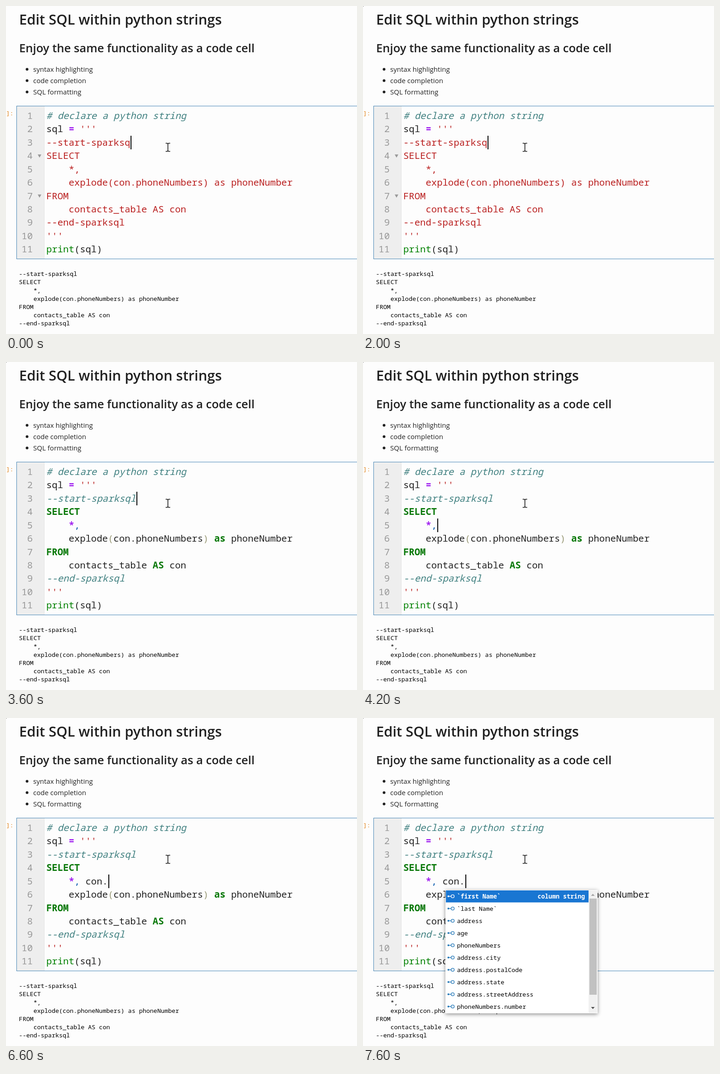
Recreate the animation shown at these times as an HTML page. Size 775 by 723 pixels, loop 8 s.

```html
<!DOCTYPE html>
<html lang="en">
<head>
<meta charset="utf-8">
<title>Edit SQL within python strings</title>
<style>
  html, body { margin: 0; width: 100%; height: 100%; overflow: hidden; background: #fdfdfd; }
  svg { display: block; width: 775px; height: 723px; }
  text { white-space: pre; fill: #212121; }
  .prose { font-family: "Open Sans", "Noto Sans", sans-serif; }
  .head { font-weight: 600; }
  .mono { font-family: "Noto Sans Mono", "DejaVu Sans Mono", monospace; font-size: 13.4px; }
  .code { font-size: 20.6px; }
  .output { fill: #000; font-weight: 500; }
  .prompt { font-weight: 500; }
  .number { fill: #999; text-anchor: end; }
  .comment { fill: #408080; font-style: italic; }
  .string { fill: #ba2121; }
  .operator { fill: #a020f0; font-weight: 700; }
  .keyword { fill: #087808; font-weight: 700; }
  .builtin { fill: #008000; }
  .comma { fill: #0055aa; }
  .paren { fill: #999977; }
  .raw .sql text { fill: #ba2121; font-weight: 400; font-style: normal; }
  .chosen { fill: #fff; font-weight: 700; }
  .icon { fill: none; stroke: #2478b8; stroke-width: 1.4; }
  .popup-box { filter: drop-shadow(0 2px 4px rgba(0, 0, 0, .45)); }
</style>
</head>
<body>
<svg id="stage" viewBox="0 0 775 723"></svg>
<script>
const LOOP = 8000;
const LEFT = 89, CHAR = 12.36, LINE = 29.42, BASE = 249;
const stage = document.getElementById('stage');

function add(parent, tag, attrs = {}, content) {
  const node = document.createElementNS('http://www.w3.org/2000/svg', tag);
  for (const key in attrs) node.setAttribute(key, attrs[key]);
  if (content !== undefined) node.textContent = content;
  return parent.appendChild(node);
}
const group = (parent, cls = '') => add(parent, 'g', { class: cls });
const write = (parent, x, y, cls, content, size) =>
  add(parent, 'text', { x, y, class: cls, ...(size && { style: `font-size:${size}px` }) }, content);
const box = (parent, x, y, width, height, fill, extra) =>
  add(parent, 'rect', { x, y, width, height, fill, ...extra });
const lineY = n => BASE + (n - 1) * LINE;
const token = (parent, line, col, cls, content) =>
  write(parent, LEFT + col * CHAR, lineY(line), 'mono code ' + cls, content);
const show = (node, on) => node.setAttribute('visibility', on ? 'visible' : 'hidden');

// Headings and list
write(stage, 29, 41, 'prose head', 'Edit SQL within python strings', 30.9);
write(stage, 29, 102, 'prose head', 'Enjoy the same functionality as a code cell', 25.6);
['syntax highlighting', 'code completion', 'SQL formatting'].forEach((item, i) => {
  add(stage, 'circle', { cx: 46.5, cy: 139.5 + 25 * i, r: 3, fill: '#212121' });
  write(stage, 60, 145 + 25 * i, 'prose', item, 15.05);
});

// Cell frame and gutter
const prompt = write(stage, 0.4, 241, 'mono prompt', ']:');
box(stage, 24, 221, 60, 336, '#eeeeee');
box(stage, 84, 221, 1, 336, '#e4e4e4');
box(stage, 23.5, 220.5, 770, 337, 'none', { stroke: '#4585b5' });
for (let n = 1; n <= 11; n++) write(stage, 59, lineY(n), 'mono code number', n);
const folds = group(stage);
for (const n of [4, 7]) {
  add(folds, 'path', { d: `M70 ${lineY(n) - 10}h8l-4 7z`, fill: '#999' });
}

// Code
token(stage, 1, 0, 'comment', '# declare a python string');
token(stage, 2, 0, '', 'sql');
token(stage, 2, 4, 'operator', '=');
token(stage, 2, 6, 'string', "'''");
const startMark = token(stage, 3, 0, '', '');

const sql = group(stage, 'sql');
[
  [4, 0, 'keyword', 'SELECT'],
  [5, 4, 'operator', '*'], [5, 5, 'comma', ','],
  [6, 4, '', 'explode'], [6, 11, 'paren', '('], [6, 12, '', 'con.phoneNumbers'],
  [6, 28, 'paren', ')'], [6, 30, 'keyword', 'as'], [6, 33, '', 'phoneNumber'],
  [7, 0, 'keyword', 'FROM'],
  [8, 4, '', 'contacts_table'], [8, 19, 'keyword', 'AS'], [8, 22, '', 'con'],
  [9, 0, 'comment', '--end-sparksql']
].forEach(args => token(sql, ...args));
const typed = token(stage, 5, 7, '', '');

token(stage, 10, 0, 'string', "'''");
token(stage, 11, 0, 'builtin', 'print');
token(stage, 11, 5, '', '(sql)');

// Printed output
[
  '--start-sparksql', 'SELECT', '    *,',
  '    explode(con.phoneNumbers) as phoneNumber',
  'FROM', '    contacts_table AS con', '--end-sparksql'
].forEach((row, i) => write(stage, 28.6, 595.2 + 18.2 * i, 'mono output', row));

// Caret and mouse pointer
const caret = box(stage, 0, 0, 2, 30, '#000');
add(stage, 'path', {
  d: 'M352.5 302.5h3.5l1.5 1.5l1.5-1.5h3.5M357.5 304v15M352.5 320.5h3.5l1.5-1.5l1.5 1.5h3.5',
  fill: 'none', stroke: '#111', 'stroke-width': 1.6
});
const corner = box(stage, 0, 0, 1, 1, '#333');

// Completion list
const popup = group(stage);
box(popup, 182, 379, 336, 272, '#fff', { class: 'popup-box' });
box(popup, 183, 380, 315, 26.5, '#1976d2');
[
  '`first Name`', '`last Name`', 'address', 'age', 'phoneNumbers', 'address.city',
  'address.postalCode', 'address.state', 'address.streetAddress', 'phoneNumbers.number'
].forEach((name, i) => {
  const y = 393 + 27 * i, color = i ? '#2478b8' : '#fff';
  add(popup, 'circle', { cx: 188.5, cy: y, r: 2, fill: color });
  add(popup, 'path', { d: `M190 ${y}h4.5`, class: 'icon', style: `stroke:${color}` });
  add(popup, 'circle', { cx: 198, cy: y, r: 3.4, class: 'icon', style: `stroke:${color}` });
  write(popup, 207.5, y + 4.5, i ? 'mono output' : 'mono chosen', name);
});
write(popup, 385.5, 397.5, 'mono chosen', 'column string');
box(popup, 498, 380, 19, 270, '#f1f1f1');
box(popup, 500, 398, 16, 212, '#c1c1c1');
add(popup, 'path', { d: 'M503.5 392h8l-4-4.5z', fill: '#a3a3a3' });
add(popup, 'path', { d: 'M503.5 637h8l-4 4.5z', fill: '#505050' });

// Each step changes only the listed parts of the state
const initial = {
  caret: true, line: 3, col: 15, raw: true, folds: true, complete: false,
  typed: '', saved: false, popup: false, corner: false
};
const steps = [
  [200, { caret: false }],
  [800, { caret: true, corner: true }],
  [1400, { caret: false }],
  [2000, { caret: true }],
  [2400, { col: 16, complete: true }],
  [2800, { raw: false, folds: false }],
  [3000, { caret: false }],
  [3400, { caret: true }],
  [3800, { line: 4, col: 6 }],
  [4200, { line: 5 }],
  [4800, { col: 7, saved: true }],
  [5200, { caret: false }],
  [5800, { caret: true, typed: 'co', col: 9, saved: false }],
  [6000, { typed: 'con', col: 10 }],
  [6400, { typed: 'con.', col: 11 }],
  [6800, { popup: true }],
  [7200, { caret: false }],
  [7600, { caret: true }]
];

function draw() {
  const time = performance.now() % LOOP;
  const s = Object.assign({}, initial, ...steps.filter(([at]) => at <= time).map(([, change]) => change));
  startMark.textContent = s.complete ? '--start-sparksql' : '--start-sparksq';
  startMark.setAttribute('class', 'mono code ' + (s.complete ? 'comment' : 'string'));
  stage.setAttribute('class', s.raw ? 'raw' : '');
  typed.textContent = s.typed;
  prompt.style.fill = s.saved ? '#307fa8' : '#e07f10';
  caret.setAttribute('x', Math.round(LEFT + s.col * CHAR + .8));
  caret.setAttribute('y', Math.round(lineY(s.line) - 21.5));
  show(caret, s.caret);
  show(folds, s.folds);
  show(popup, s.popup);
  show(corner, s.corner);
  requestAnimationFrame(draw);
}
draw();
</script>
</body>
</html>
```
